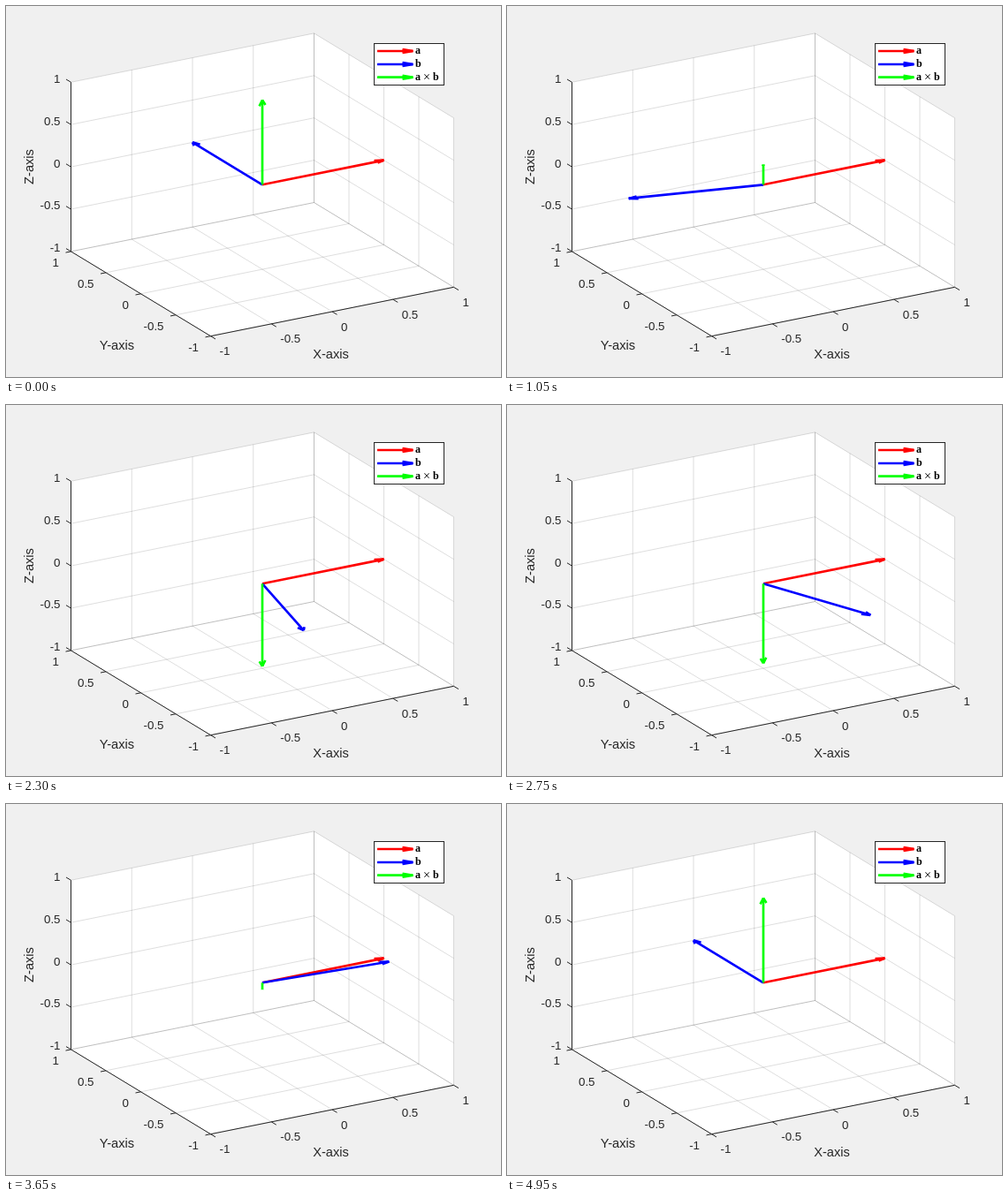
Write an HTML page with a canvas that moves like this. It is 560 px wide and 420 px high and loops after 5 s.

```html
<!DOCTYPE html>
<html lang="en">
<head>
<meta charset="utf-8">
<title>Cross product</title>
<style>
  html, body { margin: 0; width: 100%; height: 100%; overflow: hidden; background: #f0f0f0; }
  canvas { display: block; }
</style>
</head>
<body>
<canvas id="stage" width="560" height="420"></canvas>
<script>
const ctx = document.getElementById('stage').getContext('2d');
const SANS = '"Liberation Sans", Arial, sans-serif';
const SERIF = '"Liberation Serif", "Times New Roman", serif';
const INK = '#262626';
const GRID = 'rgba(38,38,38,0.15)';
const TICKS = [-1, -0.5, 0, 0.5, 1];
const RED = '#f00', BLUE = '#00f', GREEN = '#0f0';
const STEP_MS = 50, STEPS = 100;

// Orthographic view of the unit cube
const project = ([x, y, z]) => [
  290 + 137.5 * x - 79 * y,
  202.3 - 27.7 * x - 47.9 * y - 95.8 * z
];

function line(p, q, color, width = 1) {
  ctx.strokeStyle = color;
  ctx.lineWidth = width;
  ctx.beginPath();
  ctx.moveTo(...p);
  ctx.lineTo(...q);
  ctx.stroke();
}

const line3 = (p, q, color, width) => line(project(p), project(q), color, width);

function text(str, x, y, font, align = 'left', color = INK) {
  ctx.font = font;
  ctx.textAlign = align;
  ctx.fillStyle = color;
  ctx.fillText(str, x, y);
}

function plane(at) {
  ctx.fillStyle = '#fff';
  ctx.beginPath();
  for (const [u, v] of [[-1, -1], [1, -1], [1, 1], [-1, 1]]) ctx.lineTo(...project(at(u, v)));
  ctx.fill();
}

function grid(at) {
  for (const t of TICKS) {
    line3(at(t, -1), at(t, 1), GRID);
    line3(at(-1, t), at(1, t), GRID);
  }
}

function drawAxes() {
  const planes = [(u, v) => [u, 1, v], (u, v) => [1, u, v], (u, v) => [u, v, -1]];
  planes.forEach(plane);
  planes.forEach(grid);

  line3([-1, 1, -1], [-1, 1, 1], INK);
  line3([-1, 1, -1], [-1, -1, -1], INK);
  line3([-1, -1, -1], [1, -1, -1], INK);

  const small = '13.33px ' + SANS;
  const tick = (p, dx, dy) => {
    const [x, y] = project(p);
    line([x, y], [x + dx, y + dy], INK);
    return [x, y];
  };
  for (const t of TICKS) {
    let [x, y] = tick([-1, 1, t], -5.5, -3.3);
    text(t, x - 12, y + 0.4, small, 'right');
    [x, y] = tick([-1, t, -1], -6, 1.2);
    text(t, x - 13.5, y + 17.5, small, 'right');
    [x, y] = tick([t, -1, -1], 5.5, 3.3);
    text(t, x + 10, y + 21.5, small);
  }

  const large = '14.67px ' + SANS;
  text('X-axis', 367.5, 399, large, 'center');
  text('Y-axis', 125.5, 389, large, 'center');
  ctx.save();
  ctx.translate(30.5, 182);
  ctx.rotate(-Math.PI / 2);
  text('Z-axis', 0, 0, large, 'center');
  ctx.restore();
}

function drawLegend() {
  ctx.fillStyle = '#fff';
  ctx.fillRect(416.5, 42.5, 79, 47);
  ctx.strokeStyle = INK;
  ctx.lineWidth = 1;
  ctx.strokeRect(416.5, 42.5, 79, 47);

  [[RED, 51], [BLUE, 66], [GREEN, 80.7]].forEach(([color, y]) => {
    line([420, y], [460, y], color, 2.67);
    for (const side of [-1, 1]) line([460.5, y], [448.5, y + side * 2], color, 2.67);
  });
  const bold = 'bold 12px ' + SERIF;
  text('a', 463, 54, bold, 'left', '#000');
  text('b', 463, 69, bold, 'left', '#000');
  text('a', 463, 84, bold, 'left', '#000');
  text('×', 472, 84.5, '14px ' + SERIF, 'left', '#000');
  text('b', 483, 84, bold, 'left', '#000');
}

// side: direction across which the two barbs spread
function arrow(v, side, color) {
  const origin = [0, 0, 0];
  line3(origin, v, color, 2.67);
  for (const w of [-0.025, 0.025]) {
    line3(v, v.map((c, i) => 0.935 * c + w * side[i]), color, 2.67);
  }
}

function render(ms) {
  const step = Math.floor(ms / STEP_MS) % STEPS;
  const angle = 2 * Math.PI * step / (STEPS - 1);
  const s = Math.sin(angle), c = Math.cos(angle);

  ctx.fillStyle = '#f0f0f0';
  ctx.fillRect(0, 0, 560, 420);
  drawAxes();
  arrow([1, 0, 0], [0, 1, 0], RED);
  arrow([-s, c, 0], [c, s, 0], BLUE);
  arrow([0, 0, c], [c, 0, 0], GREEN);
  drawLegend();
}

const start = performance.now();
function tick() {
  render(performance.now() - start);
  requestAnimationFrame(tick);
}
tick();
</script>
</body>
</html>
```
